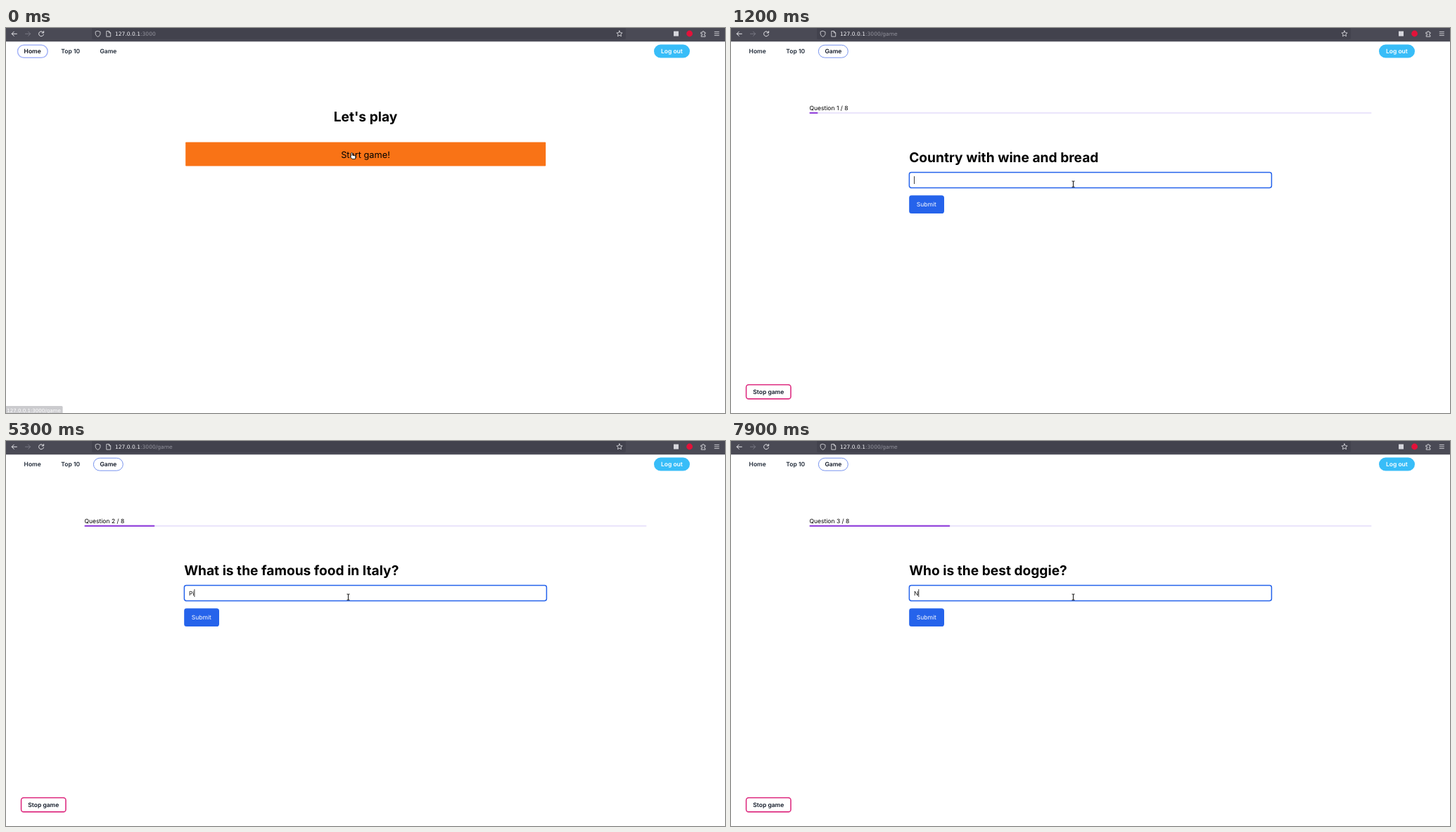
An HTML page for the animation above (8 s loop, 1022 by 548 pixels).

```html
<!DOCTYPE html>
<html lang="en">
<head>
<meta charset="utf-8">
<title>Quiz game</title>
<style>
  html, body { margin: 0; width: 100%; height: 100%; overflow: hidden; background: #fff; }
  svg { display: block; width: 1022px; height: 548px; }
  text { font-family: Inter, sans-serif; font-size: 8.52px; text-rendering: geometricPrecision; white-space: pre; }
  .ui { font-family: "DejaVu Sans", sans-serif; font-size: 7.55px; }
  .nav { font-weight: 600; fill: #1f2937; text-anchor: middle; }
  .title { font-weight: 700; font-size: 19.16px; }
  .icon { fill: none; stroke: #e6e6ea; stroke-width: 1; stroke-linecap: round; stroke-linejoin: round; }
  .cursor { fill: #fff; stroke: #111; stroke-width: .9; stroke-linejoin: round; }
</style>
</head>
<body>
<svg viewBox="0 0 1022 548">
  <rect width="1022" height="548" fill="#fff"/>

  <!-- browser bar -->
  <rect width="1022" height="19.3" fill="#4a4a55"/>
  <rect x="122" y="-4" width="759" height="20.3" rx="2" fill="#42424d"/>
  <g class="icon">
    <path d="M15.4 8.3H8.3M11.3 5.2L8.2 8.3l3.1 3.1"/>
    <path d="M27.5 8.3h7.1M31.6 5.2l3.1 3.1-3.1 3.1" stroke="#777782"/>
    <path d="M53.2 6.6A3.5 3.5 0 1 0 53.5 9.3M53.6 4.6v2.4h-2.4"/>
    <path d="M130.6 4.4l3.4 1.2v2.2c0 2.2-1.3 3.8-3.4 4.6c-2.1-.8-3.4-2.4-3.4-4.6V5.6z" stroke-width=".8"/>
    <path d="M143.2 4.5h3.2l2.3 2.3v5.4h-5.5zM146.3 4.6v2.3h2.3" stroke-width=".8"/>
    <path id="star" stroke-width=".8"/>
    <path d="M988.2 6.2h1.7a1.2 1.2 0 1 1 2.3 0h1.8v2a1.2 1.2 0 1 0 0 2.3v1.8h-5.8v-1.9a1.2 1.2 0 1 0 0-2.2z" stroke-width=".8"/>
    <path d="M1007.2 5.4h6.2M1007.2 8h6.2M1007.2 10.6h6.2" stroke-width=".8"/>
  </g>
  <rect x="949" y="4.6" width="7" height="7" fill="#d6d6dc"/>
  <circle cx="971.6" cy="8" r="4.4" fill="#e3123a"/>
  <text class="ui" x="155" y="10.7" fill="#f4f4f8">127.0.0.1<tspan id="path" fill="#93939d"></tspan></text>

  <!-- navigation -->
  <rect id="homePill" x="16.5" y="24.3" width="42.7" height="18" rx="9" fill="none" stroke="#a5b4f8" stroke-width="1.5"/>
  <rect id="gamePill" x="124.4" y="24.3" width="41.9" height="17.9" rx="8.95" fill="none" stroke="#7793ee" stroke-width="1"/>
  <text class="nav" id="home" x="37.7" y="36.2">Home</text>
  <text class="nav" x="91.7" y="36.2">Top 10</text>
  <text class="nav" id="game" x="145.4" y="36.2">Game</text>
  <rect x="921" y="23.6" width="51" height="19" rx="9.5" fill="#38bdf8"/>
  <text class="nav" x="946.4" y="36.2" style="fill:#fff">Log out</text>

  <g id="start">
    <text class="title" x="511" y="133" text-anchor="middle">Let's play</text>
    <rect x="255.2" y="162.5" width="512" height="34" rx=".8" fill="#f97316"/>
    <text x="511" y="184.6" text-anchor="middle" style="font-size:12.77px">Start game!</text>
  </g>

  <g id="play">
    <text id="count" x="111.5" y="116.5"></text>
    <rect x="111.5" y="119.8" width="799" height="2.2" rx="1.1" fill="#ebe6fb"/>
    <rect id="bar" x="111.5" y="119.8" height="2.2" rx="1.1" fill="#9648dc"/>
    <rect x="21.6" y="507.7" width="63.4" height="20.2" rx="3.5" fill="#fff" stroke="#de2f82" stroke-width="1.6"/>
    <text class="nav" x="53.3" y="521" style="fill:#111827">Stop game</text>
    <g id="form">
      <text class="title" id="ask" x="253.2" y="190.7"></text>
      <rect x="253.4" y="205.6" width="515" height="21.8" rx="2.8" fill="#fff" stroke="#2563eb" stroke-width="1.5"/>
      <text id="answer" x="260" y="219.6" fill="#111"></text>
      <rect id="caret" y="211" width=".8" height="11" fill="#111"/>
      <rect id="button" x="253.2" y="238.2" height="25.8" rx="3.6"/>
      <text id="label" x="263.8" y="254.3" fill="#fff"></text>
    </g>
  </g>

  <g id="status">
    <path d="M0 538h79q1.6 0 1.6 1.6V548H0z" fill="#42414d"/>
    <text class="ui" x="1.2" y="546.5" fill="#fff" style="font-size:7.08px">127.0.0.1:3000/game</text>
  </g>

  <g id="hand" class="cursor" transform="translate(488.6 176.8)">
    <path d="M2.7.7c.8 0 1.1.5 1.1 1.1v2.5l3.5.7c.8.2 1.2.7 1.1 1.5l-.5 3.1H3.2L1 6.7c-.5-.7.2-1.4.9-.9V1.8c0-.6.2-1.1.8-1.1z"/>
  </g>
  <path id="arrow" class="cursor" d="M491.6 178.2v9l2-1.8 1.4 3 1.6-.7-1.4-2.9h2.5z"/>
  <g id="beam" fill="none">
    <path d="M-2 -4h1.3L0 -3.4L.7 -4H2M0 -3.4V3.6M-2 4.2h1.3L0 3.6l.7 .6H2" stroke="#222" stroke-width="1.1"/>
  </g>
</svg>

<script>
const $ = id => document.getElementById(id);
const LOOP = 8000;
const show = (id, on) => $(id).setAttribute('visibility', on ? 'inherit' : 'hidden');
const put = (id, text) => { if ($(id).textContent !== text) $(id).textContent = text; };

// latest value in [time, value] pairs
const at = (t, steps) => steps.reduce((last, [time, value]) => t >= time ? value : last, steps[0][1]);

const asks = ['Country with wine and bread', 'What is the famous food in Italy?', 'Who is the best doggie?'];

let star = '';
for (let i = 0; i < 10; i++) {
  const r = i % 2 ? 2 : 4.3, a = i * Math.PI / 5;
  star += (i ? 'L' : 'M') + (872 + r * Math.sin(a)).toFixed(2) + ' ' + (8.3 - r * Math.cos(a)).toFixed(2);
}
$('star').setAttribute('d', star + 'z');

function typed(t) {
  if (t < 3500) return 'France'.slice(0, Math.max(0, Math.floor((t - 1800) / 100)));
  if (t < 6900) return 'Pizza'.slice(0, at(t, [[0, 0], [5100, 1], [5300, 2], [5500, 3], [5600, 4], [5800, 5]]));
  return t >= 7900 ? 'N' : '';
}

function draw(t) {
  const playing = t >= 600;
  const asked = t >= 700;
  show('start', !playing);
  show('play', playing);
  show('form', asked);
  show('homePill', !playing);
  show('gamePill', playing);
  $('home').style.fill = playing ? '' : '#0b0f19';
  $('game').style.fill = playing ? '#111827' : '';
  put('path', playing ? ':3000/game' : ':3000');
  $('status').setAttribute('opacity', at(t, [[0, .27], [200, 1], [600, .53], [700, .2], [800, 0]]));

  put('count', `Question ${at(t, [[0, 1], [2700, 2], [5900, 3]])} / 8`);
  $('bar').setAttribute('width', at(t, [[0, 12], [2700, 70], [2800, 99.9], [5900, 158], [6000, 194.5], [6200, 199.8]]));

  put('ask', asks[at(t, [[0, 0], [3500, 1], [6900, 2]])]);
  const text = typed(t);
  put('answer', text);
  $('caret').setAttribute('x', 260 + (text ? $('answer').getComputedTextLength() : 0.2));
  show('caret', at(t, [[0, true], [1800, false], [1900, true], [3000, false],
    [3500, true], [4800, false], [5100, true], [6000, false], [6900, true]]));

  const next = at(t, [[0, false], [2700, true], [3500, false], [5900, true], [6900, false]]);
  put('label', next ? 'Next...' : 'Submit');
  $('button').setAttribute('width', next ? 47.8 : 49.8);
  $('button').setAttribute('fill', next ? '#10b981' : '#2563eb');

  show('hand', !playing);
  show('arrow', playing && t < 800);
  show('beam', t >= 800);
  const [x, y] = at(t, [[800, [488, 213]], [900, [483.6, 225.2]], [1100, [485.2, 223.8]], [1200, [486.5, 222]]]);
  $('beam').setAttribute('transform', `translate(${x} ${y})`);
}

const begin = performance.now();
function tick() {
  draw((performance.now() - begin) % LOOP);
  requestAnimationFrame(tick);
}
tick();
</script>
</body>
</html>
```
